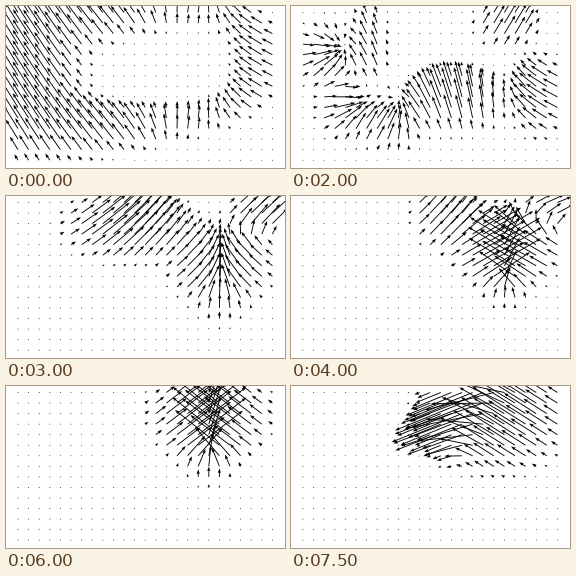
A matplotlib script for the animation above (8 s loop, 279x162 px).

```python
import numpy as np
import matplotlib.pyplot as plt
from matplotlib.animation import FuncAnimation

W, H, DPI = 279, 162, 72
FRAMES, STEP = 16, 0.5  # seconds

X, Y = np.meshgrid(12 + 10.6 * np.arange(25), 6.5 + 10.55 * np.arange(15))


def ramp(t, start, end, a=0, b=1):
    return np.interp(t, [start, end], [a, b])


def pulse(t, rise, full, hold, gone):
    return np.interp(t, [rise, full, hold, gone], [0, 1, 1, 0])


def spot(cx, cy, rx, ry):
    return np.exp(-np.hypot((X - cx) / rx, (Y - cy) / ry) ** 3)


def ring(t):
    """Rounded loop, broad and strong on the left, thin on the right."""
    dx = (X - 138) / 115
    dy = (Y + 0.08 * (X - 138) - 64) / 57
    rho = (abs(dx) ** 3 + abs(dy) ** 3) ** (1 / 3)
    thick = np.clip(20 - 10 * dx, 10, 30) * ramp(t, 0, 1, 1, 0.88)
    w = np.exp(-(abs(rho - 1) * 57 / thick) ** 3)
    u = -16 + 18 * np.exp(-((X - 185) / 45) ** 2)
    return w * ramp(t, 1, 2, 1, 0), u, -17 + 8 * dx


def sink(t, x, y, u, v):
    """Arrows from the left and from below gather near one point."""
    w = spot(x - 8, y + 6, 30, 30) * pulse(t, 0.5, 2, 2, 3)
    return w, u + 0.75 * (x - X), v + 0.75 * (y - Y)


def gust(t, window, cx, cy, rx, ry, u, v):
    return spot(cx, cy, rx, ry) * pulse(t, *window), u, v


def fan(t):
    """Two sides blow upwards across a shared axis."""
    axis = ramp(t, 4, 6, 215, 204)
    cy = ramp(t, 3, 5, 78, 45)
    dx = X - axis
    spread = np.clip(44 - 0.35 * (Y - cy), 12, 55)
    w = spot(axis, cy, spread, 42) * pulse(t, 2, 3, 6, 7.5)
    side = np.tanh(dx / ramp(t, 3, 4, 30, 5))
    lean = np.clip((cy + 45 - Y) / 30, 0, 1)
    return w, -ramp(t, 3, 4, 30, 50) * side * lean, -ramp(t, 3, 6, 24, 38)


def outflow(t):
    """Left half sweeps down and away, right half slides up into it."""
    w = spot(206, 28, 58, 46) * pulse(t, 6, 7.5, 8, 9)
    side = np.tanh((X + 0.6 * Y - 212) / 10)
    return w, -66 + 22 * side, 4 - 32 * side


def field(t):
    swell = (1, 2, 2, 3)
    parts = [
        ring(t),
        sink(t, 48, 42, 4, 0),
        sink(t, 70, 94, 6, 0),
        sink(t, 110, 103, 2, -6),
        gust(t, swell, 78, 45, 18, 48, -6, -16),
        gust(t, swell, 165, 95, 46, 28, -9 + 0.15 * (X - 165), -30),
        gust(t, swell, 246, 90, 26, 36, -18 - 0.4 * (X - 246), -14),
        gust(t, (1, 2, 4, 5), ramp(t, 2, 3, 215, 252), 18,
             28, 22, ramp(t, 2, 3, 12, 22), ramp(t, 3, 4, -20, -8)),
        gust(t, (2, 3, 4, 5), ramp(t, 3, 4, 124, 152), ramp(t, 3, 4, 30, 18),
             ramp(t, 3, 4, 54, 26), 30, 28 - 0.2 * (X - 110), -24),
        fan(t),
        outflow(t),
    ]
    norm = np.maximum(sum(w for w, _, _ in parts), 1)
    return (sum(w * u for w, u, _ in parts) / norm,
            sum(w * v for w, _, v in parts) / norm)


fig = plt.figure(figsize=(W / DPI, H / DPI), dpi=DPI, facecolor="white")
ax = fig.add_axes([0, 0, 1, 1])
ax.set(xlim=(0, W), ylim=(H, 0))
ax.axis("off")
arrows = ax.quiver(X, Y, *field(0), angles="xy", scale_units="xy", scale=1,
                   units="dots", width=0.9, headwidth=3.6, headlength=5,
                   headaxislength=4.6, minlength=1.1, color="black")


def draw(n):
    arrows.set_UVC(*field(n * STEP))
    return [arrows]


anim = FuncAnimation(fig, draw, frames=FRAMES, interval=1000 * STEP,
                     repeat=True, repeat_delay=0, blit=False)
plt.show()
```
